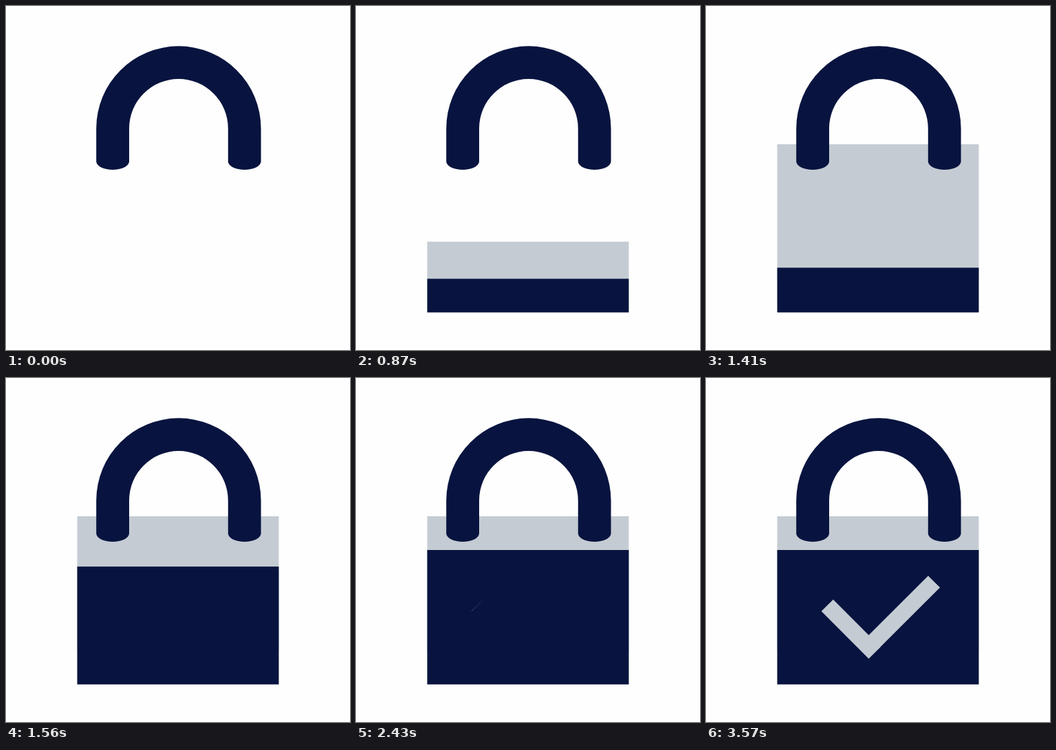
Recreate the animation shown at these times as an HTML page. Size 500x500 px, loop 4530 ms.

```html
<!DOCTYPE html>
<html lang="en">
<head>
<meta charset="utf-8">
<title>Padlock</title>
<style>
  html, body { margin: 0; height: 100%; overflow: hidden; background: #fefefe; }
  svg { display: block; width: 100%; height: 100%; }
  .navy { fill: #08143f; }
  .grey { fill: #c4cbd3; }
  .tick { stroke: #c4cbd3; stroke-width: 24.3; }
</style>
</head>
<body>
<svg viewBox="0 0 500 500">
  <rect id="panel" class="grey" x="103.5" width="293"/>
  <rect id="body" class="navy" x="103.5" width="293"/>
  <line id="short" class="tick" x1="176.3" y1="330.5"/>
  <line id="long" class="tick" x1="244.3" y1="383"/>
  <path class="navy" d="M131.2 226V178a119.7 119.7 0 0 1 239.4 0V226a23.9 12 0 0 1-47.8 0V178a71.9 71.9 0 0 0-143.8 0V226a23.9 12 0 0 1-47.8 0Z"/>
</svg>
<script>
const LOOP = 4530;
const BOTTOM = 445.4, BASE = 396.4, PANEL_TOP = 201, BODY_TOP = 250;
const el = id => document.getElementById(id);
const panel = el('panel'), body = el('body'), short = el('short'), long = el('long');

// Symmetric ease: cubic-bezier(.84, 0, .16, 1), solved by bisection
function ease(x) {
  if (x <= 0) return 0;
  if (x >= 1) return 1;
  const p = 0.84;
  let lo = 0, hi = 1, u;
  for (let i = 0; i < 30; i++) {
    u = (lo + hi) / 2;
    const bx = 3 * p * u * (1 - u) ** 2 + 3 * (1 - p) * u * u * (1 - u) + u ** 3;
    if (bx < x) lo = u; else hi = u;
  }
  return u * u * (3 - 2 * u);
}

function setRect(rect, top, bottom) {
  rect.setAttribute('y', top);
  rect.setAttribute('height', bottom - top);
}

function growLine(line, dx, dy, k) {
  line.setAttribute('x2', +line.getAttribute('x1') + dx * k);
  line.setAttribute('y2', +line.getAttribute('y1') + dy * k);
}

function draw(t) {
  const step = (start, length = 600) => ease((t - start) / length);
  const bodyTop = BOTTOM + (BASE - BOTTOM) * step(0) + (BODY_TOP - BASE) * step(1200);
  setRect(body, bodyTop, BOTTOM);
  setRect(panel, BASE + (PANEL_TOP - BASE) * step(600), BASE);
  growLine(short, 68.8, 69, step(2400, 590));
  growLine(long, 87.2, -87, step(2980, 590));
}

const origin = performance.now();
function frame() {
  draw((performance.now() - origin) % LOOP);
  requestAnimationFrame(frame);
}
frame();
</script>
</body>
</html>
```
